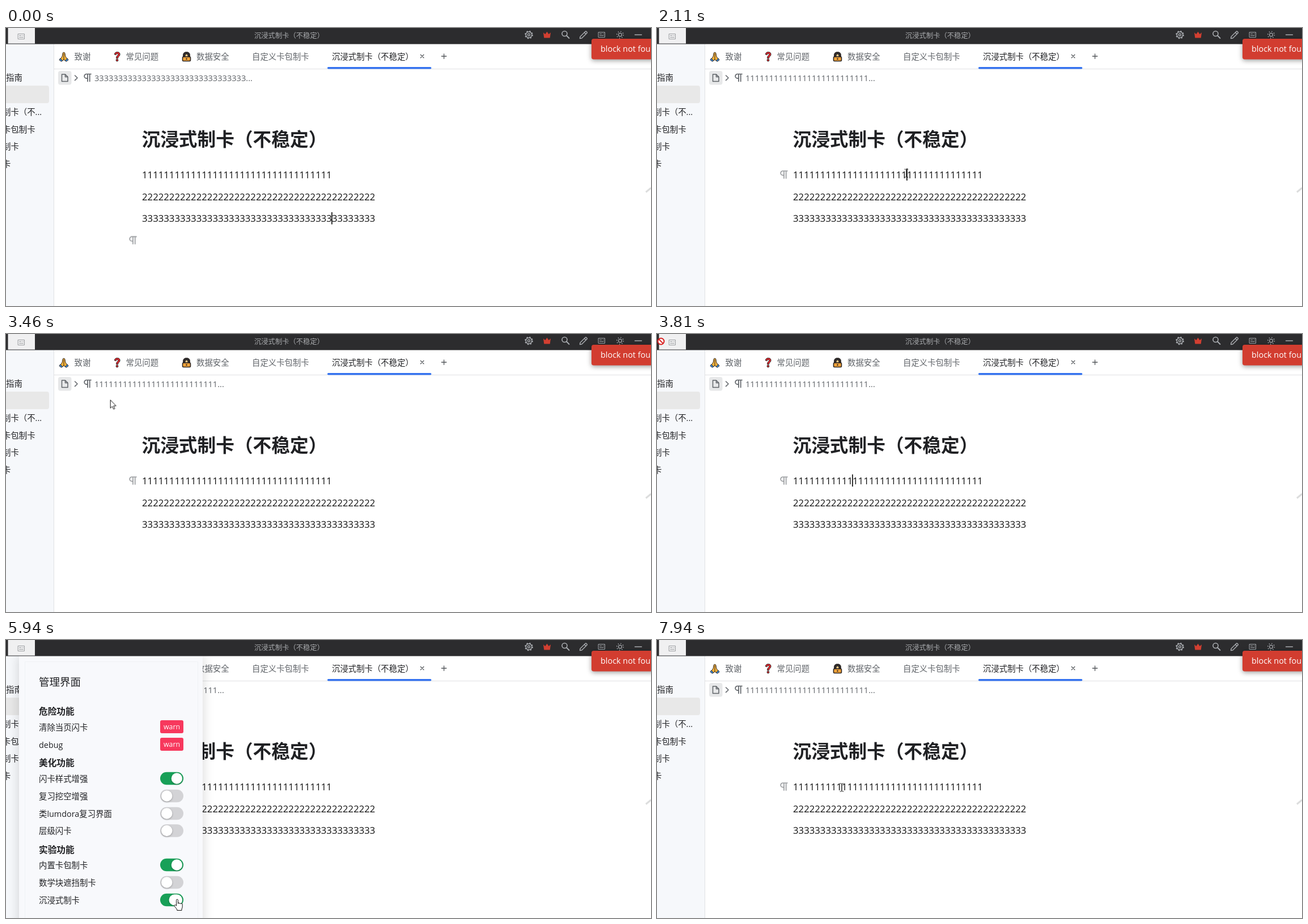
Write an HTML page that moves like this. It is 1138 by 492 pixels and loops after 8 s.

```html
<!DOCTYPE html>
<html lang="zh-CN">
<head>
<meta charset="utf-8">
<title>沉浸式制卡</title>
<style>
html, body { margin: 0; width: 100%; height: 100%; overflow: hidden; background: #fff; }
svg { display: block; width: 1138px; height: 492px; }
text { font: 14.4px "Open Sans", "Noto Sans CJK SC", "Noto Sans CJK", sans-serif; fill: #202124; white-space: pre; }
.muted { fill: #5f6368; }
.crumb { font-size: 14.62px; fill: #5f6368; }
.doc { font-size: 16.74px; fill: #111; }
.head { font-size: 15.7px; font-weight: 700; }
.line { fill: none; stroke-linecap: round; stroke-linejoin: round; }
#caret { stroke: #000; stroke-width: 1.6; }
#panel .box { filter: drop-shadow(0 0 10px rgba(0, 0, 0, .16)); }
#toast { filter: drop-shadow(0 2px 4px rgba(0, 0, 0, .4)); }
.knob { filter: drop-shadow(0 1px 1.5px rgba(0, 0, 0, .3)); }
</style>
</head>
<body>
<svg viewBox="0 0 1138 492">
  <defs>
    <path id="pilcrow" class="line" d="M13 1H5a3.8 3.8 0 0 0 0 7.6H7M7 1V14M10.7 1V14" stroke-width="1.7"/>
    <path id="card" class="line" d="M.5 .5h11v9H.5zM2.5 3.500h3.500M2.500 6.500h7M8.500 3.500h1"/>
  </defs>

  <!-- sidebar -->
  <path d="M0 28h84v464H0z" fill="#f6f8fb"/>
  <path d="M84.5 28V492M85 72.5H1138" stroke="#e0e1e3"/>
  <rect x="-6" y="102" width="82" height="31" rx="4" fill="#e8e8e8"/>
  <g id="tree"></g>

  <!-- tabs -->
  <g stroke="#2b2523" stroke-width="1" stroke-linejoin="round">
    <path d="M102 43q-2 0-2.2 3l-.6 4-3.5 5.500 3 3.200 3.300-2.700 3.300 2.700 3-3.200-3.500-5.500-.6-4q-.2-3-2.200-3z" fill="#fcb63c"/>
    <path d="M95.700 53.800l-1.700 2.700 3.500 2.700 2-1.800zM108.300 53.800l1.700 2.700-3.500 2.700-2-1.800z" fill="#3d8fe0"/>
    <path d="M102 45v11" fill="none"/>
    <path d="M191.500 47q0-4.500 4.800-4.500t4.800 4.300q0 2.500-2.500 4-1 .8-1 3h-3q-.2-3.500 1.600-4.800 1.600-1 1.600-2.200 0-1.500-1.600-1.500t-1.700 1.900z" fill="#e0252d"/>
    <circle cx="196" cy="57" r="1.900" fill="#e0252d"/>
    <path d="M312.500 52v-3.500q0-6 6-6t6 6V52z" fill="#2f2b2b"/>
    <path d="M316 51v-2q0-3 2.500-3t2.500 3v2z" fill="#f4c98a"/>
    <rect x="311.500" y="51" width="14" height="7.500" rx="1.500" fill="#f2a33a" stroke-width="1.600"/>
    <path d="M318.500 53.500v2.500" stroke-width="2"/>
  </g>
  <g class="tabs">
    <text class="muted" x="120.500" y="55.800">致谢</text>
    <text class="muted" x="211.500" y="55.800">常见问题</text>
    <text class="muted" x="336" y="55.800">数据安全</text>
    <text class="muted" x="434" y="55.800">自定义卡包制卡</text>
    <text x="575" y="55.800">沉浸式制卡（不稳定）</text>
  </g>
  <rect x="567" y="69" width="183.500" height="3.500" rx="1.700" fill="#3573f0"/>
  <path class="line" d="M731.500 47.200l5.500 5.500m0-5.500l-5.500 5.500M768.500 50h8.500M772.700 45.800v8.500" stroke="#54585c" stroke-width="1.300"/>

  <!-- breadcrumb -->
  <rect x="92" y="76" width="23.500" height="24.500" rx="4" fill="#e7e8e9"/>
  <g class="line" stroke="#5f6368" stroke-width="1.500">
    <path d="M98.500 82h6l4.500 4.500v8H98.500zM104.500 82v4.500h4.500"/>
    <path d="M121.500 84l4.500 4.300-4.500 4.300"/>
    <use href="#pilcrow" x="137" y="80.500"/>
  </g>
  <text id="crumb3" class="crumb" x="156" y="93.500"></text>
  <text id="crumb1" class="crumb" x="156" y="93.500"></text>

  <!-- document -->
  <text x="239.500" y="209" style="font-size:32.700px;font-weight:700">沉浸式制卡（不稳定）</text>
  <g id="lines"></g>
  <g stroke="#9a9da0">
    <use id="mark4" href="#pilcrow" x="217" y="368.500"/>
    <use id="mark1" href="#pilcrow" x="217" y="252"/>
  </g>
  <path d="M1129 290.500l9-7.500" stroke="#dcdddd" stroke-width="3"/>
  <g id="caret">
    <path id="caretA" d="M575 326v21.500"/>
    <path id="caretB" d="M441 248.500V270"/>
    <path id="caretC" d="M345 248.500V270"/>
  </g>

  <!-- settings panel -->
  <g id="panel">
    <rect class="box" x="23" y="28" width="324" height="480" fill="#f8f9fc"/>
    <path d="M33.500 500V38.500H338.500V500" fill="none" stroke="#f0f2f5"/>
    <text x="58" y="80.700" style="font-size:18.500px">管理界面</text>
  </g>

  <!-- title bar -->
  <path d="M0 0h1138v28.500H0z" fill="#2c2c2e"/>
  <text x="438" y="17.600" style="font-size:12.300px;fill:#a9abae">沉浸式制卡（不稳定）</text>
  <path d="M3.500 0H51v27.500H3.500z" fill="#f0f0f1"/>
  <use href="#card" x="21" y="10" stroke="#9b9da0"/>
  <g id="hover">
    <path d="M11 0h32v27.500H11z" fill="#3a3b3e"/>
    <use href="#card" x="21" y="10" stroke="#b4b6b9"/>
  </g>
  <g class="line" stroke="#a9acb0" stroke-width="1.400">
    <circle cx="922.500" cy="12" r="5.200"/>
    <circle cx="922.500" cy="12" r="6.400" stroke-width="1.800" stroke-linecap="butt" stroke-dasharray="2.500 2.527"/>
    <circle cx="922.500" cy="12" r="2"/>
    <circle cx="985.500" cy="10" r="4.500" stroke-width="1.600"/>
    <path d="M989 13.500l4.500 4.500" stroke-width="1.800"/>
    <path d="M1012.500 18.500l.6-3.300 9-9q1-.8 2 .2l.8.800q.8 1 0 1.800l-9 9zM1020.500 8l2.700 2.700"/>
    <use href="#card" x="1045" y="7" stroke-width="1"/>
    <circle cx="1083.500" cy="12" r="2.900" stroke-width="1.200"/>
    <circle cx="1083.500" cy="12" r="5.800" stroke-width="1.700" stroke-linecap="butt" stroke-dasharray="1.400 3.155"/>
    <path d="M1109.500 12h12"/>
  </g>
  <path d="M948 8l3.300 3 3.200-4.500 3.200 4.500 3.300-3-1.300 9.500h-10.400z" fill="#d23f31"/>
  <rect id="toast" x="1033" y="19" width="130" height="36.500" rx="4" fill="#d23d30"/>
  <text x="1049" y="42.300" style="fill:#fff;font-size:14.400px;font-weight:500">block not found</text>

  <!-- pointer -->
  <g id="mouse">
    <path id="arrow" d="M.5 .5V15l3.300-3.100 2.300 5 2.200-1-2.200-4.900h4.400z" fill="#fff" stroke="#111"/>
    <path id="beam" class="line" d="M-3-7h1.500Q0-7 0-5.500v11Q0 7-1.500 7H-3M3-7H1.500Q0-7 0-5.500v11Q0 7 1.500 7H3" stroke="#222"/>
    <path id="hand" d="M-1.500 1.500a1.500 1.500 0 0 1 3 0V7.500a1.400 1.400 0 0 1 2.800.2a1.400 1.400 0 0 1 2.600.5a1.200 1.200 0 0 1 2.300.8V13q0 2-1.200 4v2.500H-.2V18Q-2 15.500-4.600 12.200a1.400 1.400 0 0 1 2-2l1.100 1.200z" fill="#fff" stroke="#111"/>
    <g id="deny" fill="#fff" stroke="#d81e1e" stroke-width="2">
      <circle r="5.500"/>
      <path d="M-3.900-3.900l7.800 7.800"/>
    </g>
  </g>
</svg>
<script>
const LOOP = 8000, GREEN = '#18a058', GREY = '#d3d3d6';
const $ = id => document.getElementById(id);

function add(parent, tag, attrs, content = '') {
  const el = document.createElementNS('http://www.w3.org/2000/svg', tag);
  for (const k in attrs) el.setAttribute(k, attrs[k]);
  el.textContent = content;
  parent.append(el);
  return el;
}

// Static lists
[[0, 87, '指南'], [-6, 148, '制卡（不...'], [-6, 179, '卡包制卡'], [-6, 209, '制卡'], [-6, 240, '卡']]
  .forEach(([x, y, s]) => add($('tree'), 'text', { x, y: y + 5.5 }, s));
[['1', 35, 265.5], ['2', 43, 304.5], ['3', 43, 343]]
  .forEach(([d, n, y]) => add($('lines'), 'text', { x: 240, y, class: 'doc' }, d.repeat(n)));
$('crumb3').textContent = '3'.repeat(32) + '...';
$('crumb1').textContent = '1'.repeat(26) + '...';

// Panel rows: centre, label, kind
const rows = [
  [126, '危险功能', 'head'], [154, '清除当页闪卡', 'warn'], [185, 'debug', 'warn'],
  [217.5, '美化功能', 'head'], [245, '闪卡样式增强', 'on'], [276, '复习挖空增强', 'off'],
  [307, '类lumdora复习界面', 'off'], [337.5, '层级闪卡', 'off'],
  [371, '实验功能', 'head'], [398, '内置卡包制卡', 'on'], [429, '数学块遮挡制卡', 'off'], [460, '沉浸式制卡', 'on']
];
let track, knob;
for (const [y, label, kind] of rows) {
  const p = $('panel');
  add(p, 'text', { x: 58, y: y + 5.5, class: kind }, label);
  if (kind === 'head') continue;
  if (kind === 'warn') {
    add(p, 'rect', { x: 272, y: y - 12, width: 41, height: 23, rx: 3, fill: '#f7385d' });
    add(p, 'text', { x: 278, y: y + 4, style: 'font-size:12.3px;fill:#fff' }, 'warn');
    continue;
  }
  const on = kind === 'on';
  track = add(p, 'rect', { x: 272, y: y - 11.3, width: 41, height: 22.6, rx: 11.3, fill: on ? GREEN : GREY });
  knob = add(p, 'rect', { x: on ? 291.7 : 274, y: y - 9.7, width: 19.4, height: 19.4, rx: 9.7, fill: '#fff', class: 'knob' });
}

// Motion: every table entry is [ms, properties]
function play(el, steps, easing = 'linear') {
  const frames = steps.map(([t, props]) => ({ offset: t / LOOP, easing, ...props }));
  el.animate(frames, { duration: LOOP, iterations: Infinity });
}

// Visible during each [from, to) span, hidden otherwise
function show(id, ...spans) {
  const steps = spans[0][0] > 0 ? [[0, { opacity: 0 }]] : [];
  for (const [a, b] of spans) steps.push([a, { opacity: 1 }], [b, { opacity: 0 }]);
  if (steps[steps.length - 1][0] < LOOP) steps.push([LOOP, { opacity: 0 }]);
  play($(id), steps, 'step-end');
}

const CLICK = 2100, OPEN = 4530, CLOSE = 7470;
show('crumb3', [0, CLICK]);
show('mark4', [0, CLICK]);
show('crumb1', [CLICK, LOOP]);
show('mark1', [CLICK, LOOP]);
show('caretA', [0, 380], [910, 1460], [1970, CLICK]);
show('caretB', [CLICK, 2650]);
show('caretC', [2650, 3180], [3710, 4270]);
show('hover', [4000, 4670]);
show('panel', [OPEN, CLOSE]);

show('arrow', [780, 1640], [3260, 3740], [3920, 4000], [4670, 5340], [6880, 7700]);
show('beam', [1640, 3260], [7700, LOOP]);
show('deny', [3740, 3920]);
show('hand', [4000, 4670], [5340, 6880]);

const path = [
  [0, 914, 386], [780, 914, 386], [1320, 537, 228], [1400, 537, 228], [1460, 525, 225],
  [1650, 448, 252], [1800, 448, 252], [2080, 440, 257], [2400, 440, 257], [2650, 348, 250],
  [3090, 348, 250], [3150, 348, 248], [3450, 190, 120], [3740, 22, 20], [3810, 7, 13],
  [3880, 7, 13], [3930, 14, 18], [4000, 21, 20], [4130, 25, 21], [4610, 25, 21],
  [4730, 45, 50], [5100, 215, 330], [5340, 290, 446], [5410, 301, 459], [5600, 301, 459],
  [5610, 302, 459], [6750, 302, 459], [7000, 345, 375], [7280, 393, 271],
  [7410, 393, 271], [7700, 352, 264], [7940, 326, 261], [LOOP, 326, 261]
];
play($('mouse'), path.map(([t, x, y]) => [t, { transform: `translate(${x}px, ${y}px)` }]));

const wide = { x: '287.5px', width: '23.6px' };
play(knob, [
  [0, { x: '291.7px', width: '19.4px' }], [5890, { x: '291.7px', width: '19.4px' }],
  [5940, wide], [5960, wide],
  [6270, { x: '274px', width: '19.4px' }], [LOOP, { x: '274px', width: '19.4px' }]
]);
play(track, [[0, { fill: GREEN }], [5960, { fill: GREEN }], [6270, { fill: GREY }], [LOOP, { fill: GREY }]]);
</script>
</body>
</html>
```
